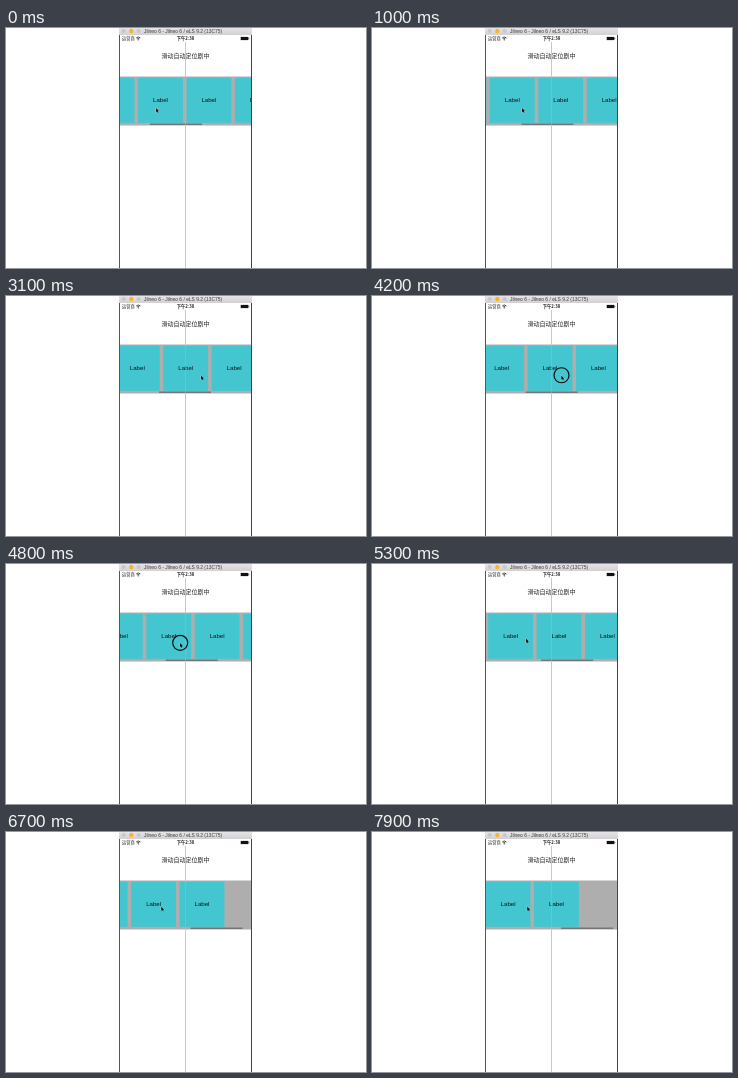
Recreate the animation shown at these times as an HTML page with a canvas. Size 360 by 240 pixels, loop 8000 ms.

```html
<!DOCTYPE html>
<html lang="zh-CN">
<head>
<meta charset="utf-8">
<style>
html, body { margin: 0; width: 100%; height: 100%; overflow: hidden; background: #fff; }
canvas { display: block; width: 360px; height: 240px; }
</style>
</head>
<body>
<canvas id="stage"></canvas>
<script>
const LOOP = 8000, STEP = 100;
const LEFT = 113, RIGHT = 246, MID = 179.5;
const PITCH = 48.4, CELL = 44.8, CELLS = 6;
const PRESS = 3.7, DRAG = 3.924, RELEASE = 5.216;
const LATIN = '"Liberation Sans", Arial, sans-serif';
const HAN = '"Noto Sans CJK SC", "Noto Sans CJK", sans-serif';

const canvas = document.getElementById('stage');
const ctx = canvas.getContext('2d');
const ratio = window.devicePixelRatio || 1;
canvas.width = 360 * ratio;
canvas.height = 240 * ratio;
ctx.scale(ratio, ratio);

function rect(x, y, w, h, color) {
  ctx.fillStyle = color;
  ctx.fillRect(x, y, w, h);
}

function dot(x, y, r, color) {
  ctx.fillStyle = color;
  ctx.beginPath();
  ctx.arc(x, y, r, 0, Math.PI * 2);
  ctx.fill();
}

function text(str, x, y, font, color, align = 'center') {
  ctx.font = font;
  ctx.fillStyle = color;
  ctx.textAlign = align;
  ctx.fillText(str, x, y);
}

const clamp = v => Math.min(1, Math.max(0, v));
const smooth = v => v * v * (3 - 2 * v);
const mix = (a, b, v) => a + (b - a) * v;
const dragged = t => 22.15 * Math.max(0, Math.min(t, RELEASE) - DRAG) ** 2;

// The list glides exponentially and stops once a cell is centred.
function scrollAt(t) {
  if (t < DRAG) return Math.min(100, 102 - 25.2 * Math.exp(-0.829 * t));
  if (t < RELEASE) return 100 + dragged(t);
  return Math.min(197, 199 - 62 * Math.exp(-0.815 * (t - RELEASE)));
}

function pointerAt(t) {
  const away = smooth(clamp((t - 1.9) / 0.9));
  const settle = smooth(clamp((t - 3.2) / 0.5));
  const rest = smooth(clamp((t - 5.9) / 0.4));
  const d = dragged(t);
  return {
    x: mix(150, 195, away) - 4 * settle - d + 1.2 * rest,
    y: 80 - 0.5 * away - 0.5 * clamp(d / 17) - 4.4 * clamp((d - 17) / 20)
  };
}

function drawTitleBar() {
  const shade = ctx.createLinearGradient(0, 0, 0, 7);
  shade.addColorStop(0, '#e6e4e6');
  shade.addColorStop(1, '#d2d0d2');
  rect(LEFT, 0, RIGHT - LEFT, 7, shade);
  dot(117.7, 3, 2.1, '#c9c7c9');
  dot(125.3, 3, 2.2, '#f8b42c');
  dot(132.6, 3, 2.1, '#c9c7c9');
  text('Jilneo 6 - Jilneo 6 / eLS 9.2 (13C75)', 138, 4.9, '4.9px ' + LATIN, '#3c3c3c', 'left');
}

function drawStatus() {
  text('运营商', 116, 12.2, '4.2px ' + HAN, '#222', 'left');
  ctx.strokeStyle = '#222';
  ctx.lineWidth = 0.8;
  for (const r of [1.5, 2.9]) {
    ctx.beginPath();
    ctx.arc(132.3, 12, r, -Math.PI * 0.77, -Math.PI * 0.23);
    ctx.stroke();
  }
  dot(132.3, 11.8, 0.6, '#222');
  text('下午2:38', MID, 12.1, 'bold 4.3px ' + HAN, '#222');
  rect(234.7, 8.9, 7.6, 3.2, '#111');
  rect(242.6, 9.8, 0.6, 1.4, '#111');
}

function drawList(offset) {
  ctx.save();
  ctx.beginPath();
  ctx.rect(LEFT + 0.5, 48, RIGHT - LEFT - 1, 50);
  ctx.clip();
  rect(LEFT, 48.5, RIGHT - LEFT, 49, '#aeaeae');
  for (let i = 0; i < CELLS; i++) {
    const x = 134.5 - offset + i * PITCH;
    rect(x - CELL / 2, 49.7, CELL, 45.1, '#43c6d0');
    text('Label', x, 74.3, '6.1px ' + LATIN, '#111');
  }
  rect(144 + (offset - 77) * 0.392, 95.6, 52, 1.2, '#686868');
  ctx.restore();
}

function drawPointer(p, pressed) {
  if (pressed) {
    ctx.strokeStyle = '#111';
    ctx.lineWidth = 1.2;
    ctx.beginPath();
    ctx.arc(p.x + 0.2, p.y - 0.2, 7.5, 0, Math.PI * 2);
    ctx.stroke();
  }
  ctx.save();
  ctx.translate(p.x, p.y);
  ctx.beginPath();
  [[0, 0], [0, 4.3], [1, 3.5], [1.7, 5], [2.5, 4.6], [1.9, 3.2], [3, 3.1]]
    .forEach(([x, y]) => ctx.lineTo(x, y));
  ctx.closePath();
  ctx.strokeStyle = 'rgba(255,255,255,.6)';
  ctx.lineWidth = 0.6;
  ctx.stroke();
  ctx.fillStyle = '#111';
  ctx.fill();
  ctx.restore();
}

function draw(t) {
  rect(0, 0, 360, 240, '#fff');
  drawTitleBar();
  drawStatus();
  text('滑动自动定位剧中', MID, 30.2, '6px ' + HAN, '#222');
  drawList(scrollAt(t));
  rect(179, 14, 1, 34.5, '#c8c8c8');
  rect(179, 48.5, 1, 49, 'rgba(180,180,180,.5)');
  rect(179, 97.5, 1, 142.5, '#c8c8c8');
  rect(LEFT, 7, 1, 233, '#555');
  rect(RIGHT - 1, 7, 1, 233, '#444');
  drawPointer(pointerAt(t), t >= PRESS && t < RELEASE);
}

const start = performance.now();
function tick() {
  const ms = (performance.now() - start) % LOOP;
  draw(Math.floor(ms / STEP) * STEP / 1000);
  requestAnimationFrame(tick);
}
tick();
</script>
</body>
</html>
```
